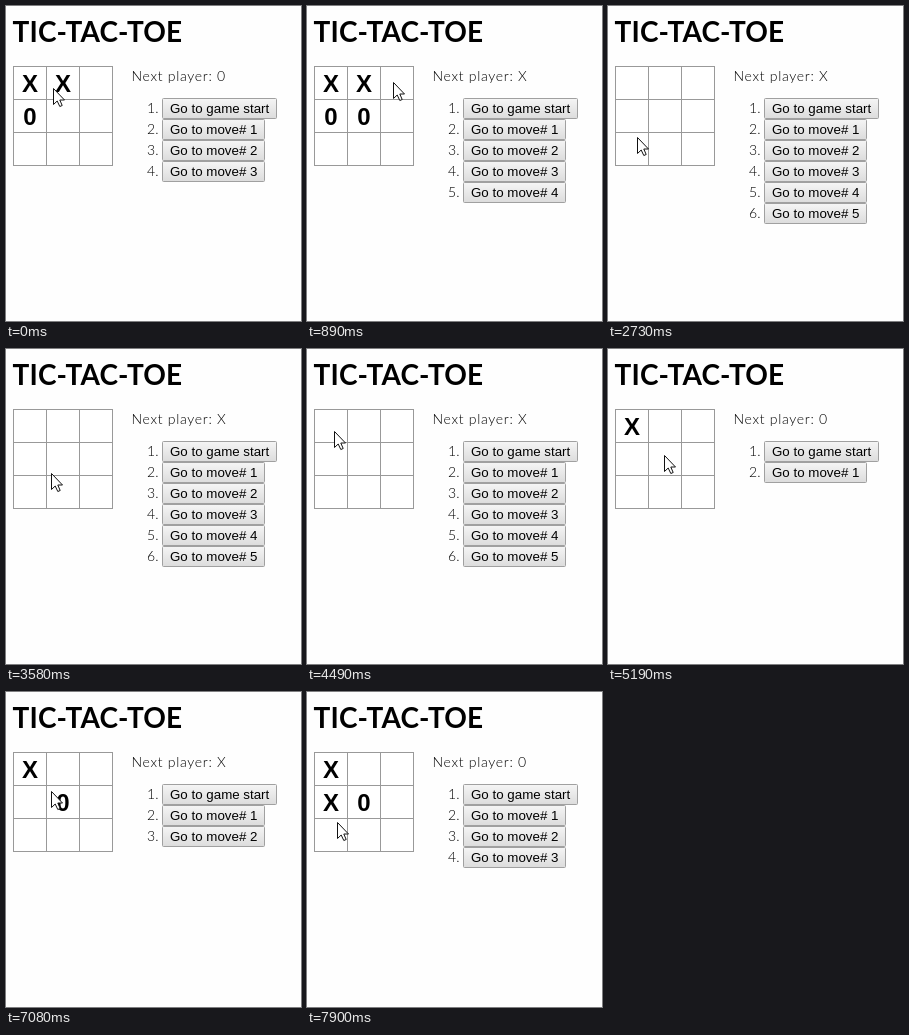
Recreate the animation shown at these times as an HTML page. Size 295 px wide and 315 px high, loop 8000 ms.

```html
<!DOCTYPE html>
<html lang="en">
<head>
<meta charset="utf-8">
<title>Tic-tac-toe</title>
<style>
  html, body { margin: 0; width: 100%; height: 100%; overflow: hidden; background: #fefefe; }
  svg { display: block; width: 295px; height: 315px; }
  text { font: 300 14px Lato, sans-serif; fill: #000; white-space: pre; }
  .title { font-size: 28px; font-weight: 700; letter-spacing: .15px; }
  .status { letter-spacing: .7px; }
  .mark { font: 700 24px "Liberation Sans", Arial, sans-serif; text-anchor: middle; }
  .label { font: 13.333px "Liberation Sans", Arial, sans-serif; }
  .number { text-anchor: end; }
  .cell { fill: #fff; stroke: #999; }
  .won { fill: #10e58f; }
  .focus { fill: none; stroke: #5b9fdc; }
  .button { fill: url(#face); stroke: #a0a0a0; }
</style>
</head>
<body>
<svg viewBox="0 0 295 315">
  <defs>
    <linearGradient id="face" x2="0" y2="1">
      <stop stop-color="#f5f5f5"/>
      <stop offset="1" stop-color="#dcdcdc"/>
    </linearGradient>
  </defs>
  <text class="title" x="6.5" y="36">TIC-TAC-TOE</text>
  <g id="game"></g>
  <path id="cursor" d="M.5 .5V16.5L4.2 13L6.8 18.5L9.2 17.5L6.8 12H11.5Z" fill="#fff" stroke="#111"/>
</svg>
<script>
const LOOP = 8000;
const SAMPLE = 140; // the pointer advances in visible steps of about this many ms
const CELL = 33, ROW = 21;
const game = document.getElementById('game');
const cursor = document.getElementById('cursor');

const glides = [], games = [];

const glide = (start, end, x, y) => glides.push({ start, end, x, y });

function play(at, square) {
  const { moves, step } = games[games.length - 1];
  games.push({ at, moves: [...moves.slice(0, step), square], step: step + 1 });
}

function rewind(at) {
  games.push({ at, moves: games[games.length - 1].moves, step: 0 });
}

games.push({ at: 0, moves: [0, 3, 1], step: 3 });
glide(0, 0, 47, 82);
glide(120, 360, 59, 109);
play(480, 4);
glide(760, 890, 86, 76);
play(1160, 2);
glide(1450, 1750, 173, 102);
rewind(2035);
glide(2180, 2730, 29, 131);
glide(3440, 3750, 57, 118);
glide(3900, 4490, 27, 82);
play(4800, 0);
glide(4940, 5220, 60, 109);
play(5360, 4);
glide(5500, 6170, 81, 80);
glide(6300, 6440, 73, 79);
glide(6810, 7437, 29, 110);
play(7590, 3);
glide(7900, 7900, 30, 130);

function pointerAt(t) {
  const i = glides.findLastIndex(g => g.start <= t);
  const to = glides[i], from = glides[i - 1] || to;
  const gaps = Math.round((to.end - to.start) / SAMPLE);
  const done = t >= to.end ? gaps : Math.floor((t - to.start) / (to.end - to.start) * gaps);
  const eased = 1 - (1 - (done + 1) / (gaps + 1)) ** 2;
  return ['x', 'y'].map(axis => Math.round(from[axis] + (to[axis] - from[axis]) * eased));
}

const playerOf = turn => turn % 2 ? '0' : 'X';

function winningLine(squares) {
  const line = (first, stride) => [0, 1, 2].map(n => first + n * stride);
  const lines = [line(0, 4), line(2, 2)];
  for (let n = 0; n < 3; n++) lines.push(line(n * 3, 1), line(n, 3));
  return lines.find(([a, b, c]) => squares[a] && squares[a] === squares[b] && squares[a] === squares[c]);
}

const box = (name, x, y, width, height, rx = 0) =>
  `<rect class="${name}" x="${x + .5}" y="${y + .5}" width="${width}" height="${height}" rx="${rx}"/>`;
const words = (name, x, y, text) => `<text class="${name}" x="${x}" y="${y}">${text}</text>`;

function drawGame({ moves, step }) {
  const squares = Array(9).fill('');
  moves.slice(0, step).forEach((square, turn) => squares[square] = playerOf(turn));
  const line = winningLine(squares);
  const corner = i => [7 + i % 3 * CELL, 60 + Math.floor(i / 3) * CELL];

  let svg = '';
  squares.forEach((mark, i) => {
    const [x, y] = corner(i);
    svg += box(line && line.includes(i) ? 'cell won' : 'cell', x, y, CELL, CELL);
    svg += words('mark', x + 17, y + 26, mark);
  });
  if (line) svg += box('focus', ...corner(moves[step - 1]), CELL, CELL);

  svg += words('status', 125.5, 75,
    line ? `Winner: ${playerOf(step - 1)}` : `Next player: ${playerOf(step)}`);
  for (let i = 0; i <= moves.length; i++) {
    const y = 92 + i * ROW;
    svg += words('number', 152.5, y + 15, `${i + 1}.`);
    svg += box('button', 156, y, i ? 102 : 114, ROW - 1, 1);
    svg += words('label', 164, y + 15, i ? `Go to move# ${i}` : 'Go to game start');
  }
  game.innerHTML = svg;
}

let shown;
function render(t) {
  const current = games.findLast(g => g.at <= t);
  if (current !== shown) drawGame(shown = current);
  cursor.setAttribute('transform', `translate(${pointerAt(t)})`);
}

function tick() {
  render(performance.now() % LOOP);
  requestAnimationFrame(tick);
}
tick();
</script>
</body>
</html>
```
